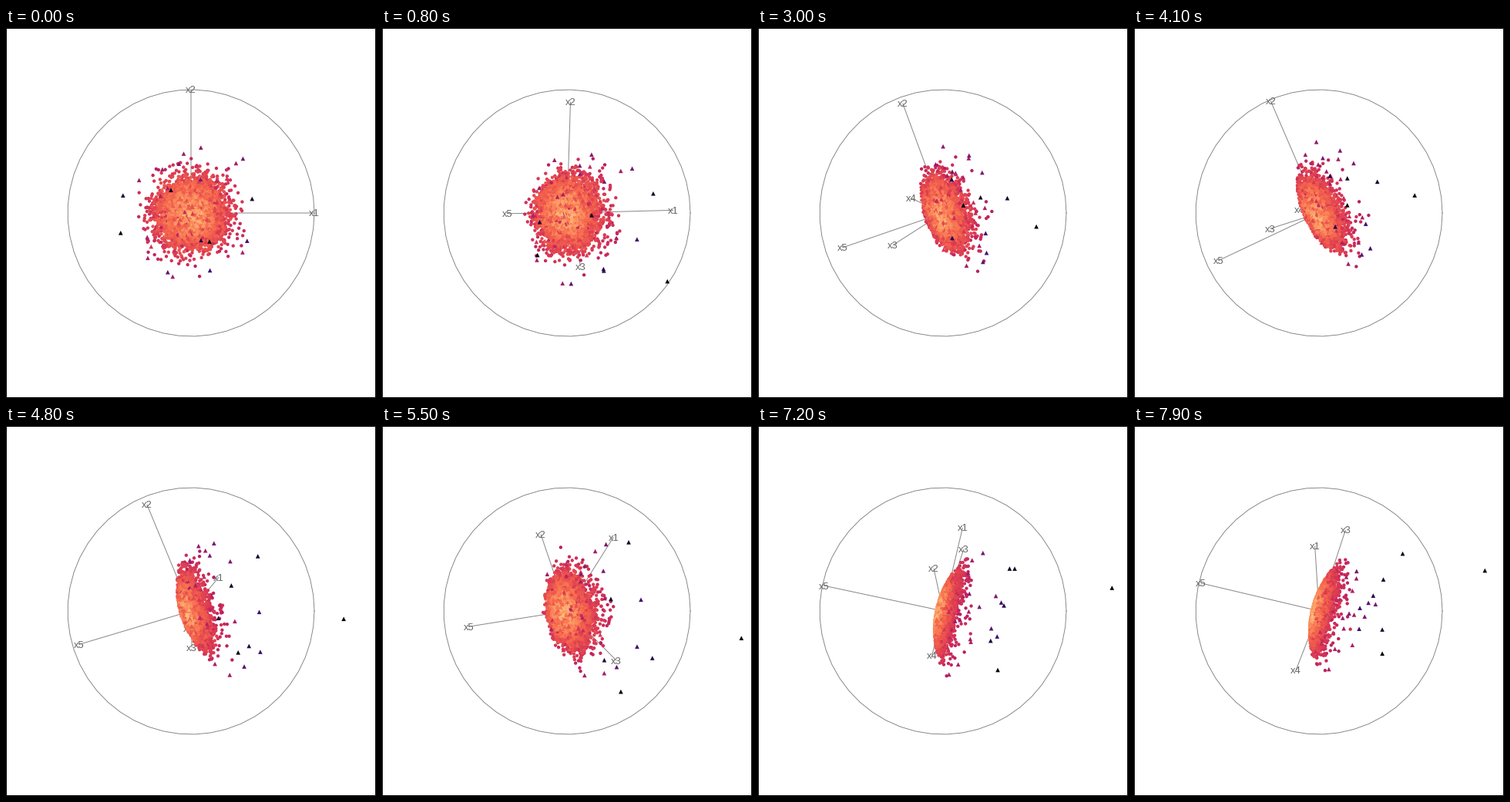
A matplotlib script for the animation above (8000 ms loop, 480 by 480 pixels).

```python
import numpy as np
import matplotlib.pyplot as plt
from matplotlib.animation import FuncAnimation
from matplotlib.collections import LineCollection
from matplotlib.colors import LinearSegmentedColormap
from matplotlib.patches import Rectangle

plt.rcParams["font.family"] = "Liberation Sans"
SIZE, RADIUS, FRAMES = 480, 160, 80
CENTER = SIZE / 2
BULK, STRAYS, SCALE = 6000, 32, 20.5
HEAT = LinearSegmentedColormap.from_list("heat", [
    "#000004", "#3b0f70", "#86196f", "#bf2160",
    "#dc3a52", "#f7694c", "#fda469", "#fed892"])

# Tour stops: frame -> tips of x1..x5 in the complex plane
STOPS = {
    0: (1, 1j, 0, 0, 0),
    17: (.42 + .1j, .11 + .58j, .17 - .81j, -.16 - .03j, -.87 - .04j),
    30: (.05 - .22j, -.33 + .89j, -.41 - .26j, -.26 + .12j, -.82 - .28j),
    41: (.03 - .1j, -.39 + .91j, -.4 - .13j, -.16 + .03j, -.82 - .39j),
    55: (.38 + .6j, -.21 + .62j, .4 - .4j, .12 - .28j, -.8 - .13j),
    65: (.33 + .74j, -.19 + .55j, .1 + .28j, .02 - .2j, -.92 + .18j),
    79: (-.03 + .53j, .04 + .1j, .22 + .66j, -.19 - .48j, -.96 + .22j),
}


def make_data():
    """Gaussian cloud bent into a bowl along x5, with scattered strays."""
    rng = np.random.default_rng(5)
    flat = np.vstack([rng.normal(0, SCALE, (BULK, 4)),
                      rng.normal(0, 42, (STRAYS, 4))])
    r2 = (flat**2).sum(axis=1)
    drop = np.zeros(len(flat))
    drop[BULK:] = rng.exponential(22, STRAYS)
    x5 = 7 - 0.004 * r2 - drop
    data = np.column_stack([flat, x5])
    data[-1] = 24, -37, 131, -4, -197  # the farthest stray

    dist = np.sqrt(r2) / SCALE + drop / 25
    dist[-1] = 8
    stray = (dist > 4.3) | (rng.random(len(data)) < 0.03)
    return data, HEAT(np.clip(1 - 0.14 * dist, 0, 1)), stray


def basis(frame):
    """Orthonormal 5x2 projection for a frame."""
    times = list(STOPS)
    i = min(np.searchsorted(times, frame, side="right"), len(times) - 1)
    a, b = times[i - 1], times[i]
    t = (frame - a) / (b - a)
    tips = (1 - t) * np.array(STOPS[a]) + t * np.array(STOPS[b])
    u, _, vt = np.linalg.svd(np.column_stack([tips.real, tips.imag]), full_matrices=False)
    return u @ vt


data, colors, stray = make_data()

fig = plt.figure(figsize=(SIZE / 72, SIZE / 72), dpi=72, facecolor="white")
ax = fig.add_axes([0, 0, 1, 1])
ax.set(xlim=(0, SIZE), ylim=(0, SIZE))
ax.axis("off")

ax.add_patch(Rectangle((0.5, 0.5), SIZE - 1, SIZE - 1, fill=False, ec="black",
                       lw=1, snap=False, clip_on=False))
angle = np.linspace(0, 2 * np.pi, 50)
ax.plot(CENTER + RADIUS * np.cos(angle), CENTER + RADIUS * np.sin(angle),
        color="#7f7f7f", lw=0.9)

spokes = ax.add_collection(LineCollection([], colors="#888888", linewidths=1, zorder=2))
spokes.set_snap(False)
labels = [ax.text(0, 0, f"x{i + 1}", size=13, color="#666666", ha="center",
                  va="center_baseline", zorder=3) for i in range(5)]


def cloud(mask, marker, size, z):
    start = np.zeros(mask.sum())
    pts = ax.scatter(start, start, s=size, c=colors[mask], marker=marker,
                     linewidths=0, zorder=z)
    return pts, data[mask]


clouds = [cloud(~stray, "o", 19, 4), cloud(stray, "^", 32, 5)]


def update(frame):
    proj = basis(frame)
    tips = CENTER + RADIUS * proj
    spokes.set_segments([[(CENTER, CENTER), tip] for tip in tips])
    for label, tip in zip(labels, tips):
        label.set_position(tip)
    for pts, values in clouds:
        pts.set_offsets(CENTER + values @ proj)
    return [spokes, *labels, *(pts for pts, _ in clouds)]


anim = FuncAnimation(fig, update, frames=FRAMES, interval=100, repeat=True, repeat_delay=0)
plt.show()
```
